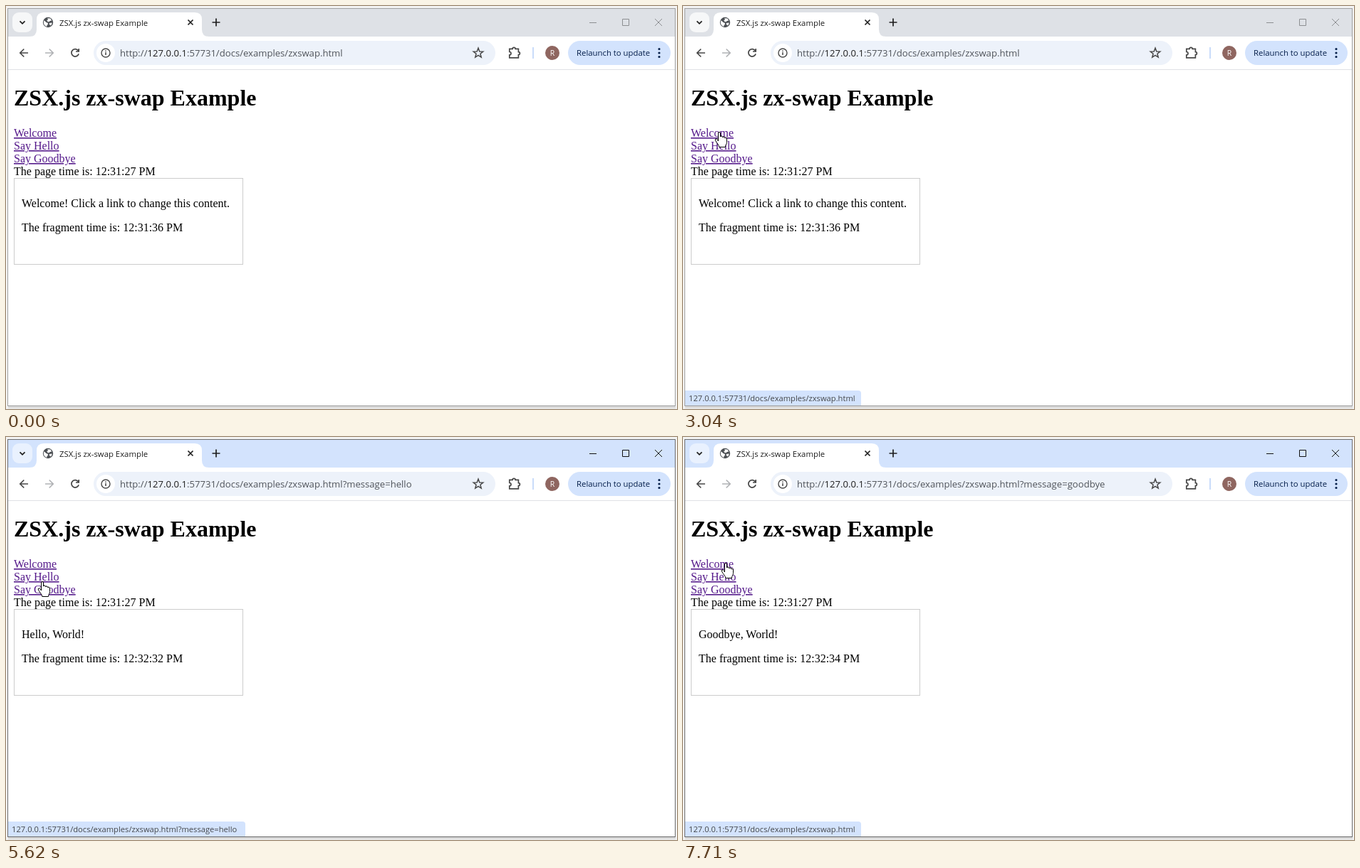
An HTML page for the animation above (8000 ms loop, 942 by 567 pixels).

```html
<!DOCTYPE html>
<html lang="en">
<head>
<meta charset="utf-8">
<title>ZSX.js zx-swap Example</title>
<style>
  html, body { margin: 0; width: 100%; height: 100%; overflow: hidden; background: #f3f3f3; }
  svg { display: block; width: 942px; height: 567px; }
  text { white-space: pre; }
  .ui { font-family: 'Open Sans', 'Noto Sans', sans-serif; font-size: 11.35px; fill: #1f1f1f; }
  .url { font-size: 13.12px; fill: #50545a; }
  .page { font-family: 'Liberation Serif', 'Times New Roman', serif; font-size: 16px; fill: #000; }
  .link { fill: #551a8b; text-decoration: underline; }
  .link.active { fill: #f00; }
  .icon { fill: none; stroke: #474747; stroke-width: 1.7; }
  #frame { fill: none; stroke: #a0a0a0; }
  #bar { fill: #dee1e6; }
  #search { fill: #f6f7f8; }
  #controls { fill: none; stroke: #8c8e91; }
  .focused #frame { stroke: #6c6c6c; }
  .focused #bar { fill: #d3e3fd; }
  .focused #search { fill: #e9f1fe; }
  .focused #controls { stroke: #111; }
  #spot { fill: #fff566; mix-blend-mode: multiply; }
  #cursor path { fill: #fff; stroke: #000; }
</style>
</head>
<body>
<svg id="stage" viewBox="0 0 942 567">
  <defs>
    <linearGradient id="shade" x2="0" y2="1">
      <stop stop-color="#d2d2d2"/><stop offset="1" stop-color="#ececec"/>
    </linearGradient>
  </defs>
  <rect width="942" height="567" fill="#f3f3f3"/>
  <rect x="3" y="563" width="937" height="4" fill="url(#shade)"/>
  <rect x="3" y="4" width="936" height="558" fill="#fff"/>
  <rect id="bar" x="3" y="4" width="936" height="39"/>

  <!-- tab strip -->
  <rect id="search" x="9" y="9" width="28" height="28" rx="9"/>
  <path class="icon" d="M19.5 21.3l3.5 3.5 3.5-3.5" style="stroke:#1f1f1f"/>
  <path d="M33 43q10 0 10-10V19q0-10 10-10H265q10 0 10 10V33q0 10 10 10Z" fill="#fff"/>
  <circle cx="59" cy="23" r="7.2" fill="#4c5054"/>
  <path d="M53.6 20.3l3.2 3 2 .5v2.3l-1.4 1.2v1.6q-4.6-1.4-4.6-6.2ZM58.2 17.3l4 .2 2 3-2.6.4-1.2 1.6-2.2-.8-1-1.8 1.8-.5ZM61 24l3.6-.4q0 2.4-1.8 4l-2.2-1.8Z" fill="#fff"/>
  <text class="ui" x="75" y="28">ZSX.js zx-swap Example</text>
  <path class="icon" d="M255.5 19.5l7 7m0-7l-7 7M289.5 23h11M295 17.5v11" style="stroke:#1f1f1f"/>
  <path id="controls" d="M819 23.5h10M865.5 18.5h9v9h-9ZM911 18l10 10m0-10l-10 10"/>

  <!-- toolbar -->
  <path class="icon" d="M31 66H20M25.3 60.5l-5.5 5.5 5.5 5.5"/>
  <path class="icon" d="M55 66h11M60.7 60.5l5.5 5.5-5.5 5.5" style="stroke:#b0b2b5"/>
  <path class="icon" d="M101.6 63.2a5.2 5.2 0 1 0 .5 4M102.2 60v4h-4.2"/>
  <rect x="123" y="49" width="564" height="34" rx="17" fill="#edf2fa"/>
  <circle cx="140" cy="66" r="13" fill="#fff"/>
  <circle class="icon" cx="140" cy="66" r="6" style="stroke-width:1.4"/>
  <path class="icon" d="M140 65v4M140 62.4v1.6" style="stroke-width:1.5"/>
  <text class="ui url" x="160" y="71">http://<tspan fill="#1f1f1f">127.0.0.1</tspan>:57731/docs/examples/zxswap.html<tspan id="query"></tspan></text>
  <path id="star" class="icon" style="stroke-width:1.5"/>
  <path class="icon" d="M706.8 60.3h4.3a2 2 0 0 1 4 0h4.3v4.3a2 2 0 0 1 0 4v4.3h-12.6v-4a2.2 2.2 0 0 0 0-4.4Z"/>
  <path d="M740 58v16" stroke="#c9dcfa" stroke-width="2"/>
  <circle cx="767" cy="66" r="10" fill="#8f6660"/>
  <text class="ui" x="767" y="70" text-anchor="middle" style="fill:#fff;font-size:10.5px">R</text>
  <rect x="789" y="49" width="144" height="34" rx="17" fill="#d3e3fd"/>
  <text class="ui" x="801" y="70" style="fill:#041e49">Relaunch to update</text>
  <path d="M917 60.5h0M917 66h0M917 71.5h0" stroke="#041e49" stroke-width="3.2" stroke-linecap="round"/>
  <path d="M3 89.5h936" stroke="#dfe1e5"/>

  <!-- page -->
  <g class="page">
    <text x="11" y="140" font-size="32" font-weight="700">ZSX.js zx-swap Example</text>
    <text class="link" x="11" y="184">Welcome</text>
    <text class="link" x="11" y="202">Say Hello</text>
    <text class="link" x="11" y="220">Say Goodbye</text>
    <text x="11" y="238">The page time is: 12:31:27 PM</text>
    <rect x="11.5" y="242.5" width="321" height="121" fill="none" stroke="#ccc"/>
    <text id="message" x="22" y="283"></text>
    <text id="stamp" x="22" y="317"></text>
  </g>

  <g id="status">
    <path id="bubble" fill="#d3e3fd"/>
    <text class="ui" x="8" y="556" style="fill:#44474b;font-size:11.18px">127.0.0.1:57731/docs/examples/zxswap.html<tspan id="target"></tspan></text>
  </g>
  <rect id="frame" x="2.5" y="3.5" width="937" height="559"/>

  <circle id="spot" r="12.5"/>
  <g id="cursor">
    <path id="arrow" d="M.5.7V16.6L4.2 13.1 6.6 18.5 9.2 17.4 6.8 12.1H11.6Z"/>
    <path id="hand" d="M-1.5 13V2Q-1.5.5 0 .5T1.5 2V7Q1.7 5.9 3 5.9T4.5 7.4V8Q4.7 6.9 6 6.9T7.5 8.4V9Q7.8 8 9 8.1T10.5 10V14.5Q10.5 16.6 9.3 18.3Q8.5 19.6 8.5 21.5H-.2Q-.3 19.6-1.6 18Q-3.4 15.6-5 13Q-6.5 10.8-5.3 10Q-3.8 9.2-2.6 11Z"/>
  </g>
</svg>
<script>
const LOOP = 8000, STEP = 67;
const el = id => document.getElementById(id);
const links = [...document.querySelectorAll('.link')];
const linkEnds = [72, 75, 98];

// pointer path: time, x, y
const path = [
  [1040, 915, 577], [1110, 880, 556], [1870, 443, 299], [2300, 165, 213],
  [2710, 60, 181], [3040, 51, 177], [3690, 51, 177], [4100, 51, 195],
  [4300, 51, 196], [5553, 51, 196], [5620, 51, 203], [6030, 51, 217],
  [7170, 51, 217], [7710, 60, 177], [LOOP, 60, 177]
];

const clicks = [
  { link: 0, down: 3240, red: 3310, up: 3370, y: 177 },
  { link: 1, down: 4690, red: 4690, up: 4820, y: 197 },
  { link: 2, down: 6760, red: 6830, up: 6910, y: 217 }
];

const WELCOME = 'Welcome! Click a link to change this content.';
const contents = [
  { from: 0, text: WELCOME, time: '12:31:36', query: '' },
  { from: 3370, text: WELCOME, time: '12:32:31', query: '' },
  { from: 4820, text: 'Hello, World!', time: '12:32:32', query: '?message=hello' },
  { from: 6910, text: 'Goodbye, World!', time: '12:32:34', query: '?message=goodbye' }
];

const statuses = {
  home: ['', 250],
  short: ['?message...', 314],
  hello: ['?message=hello', 336],
  goodbye: ['?message=goodbye', 357]
};

const slope = (i, k) => (path[i + 1][k] - path[i][k]) / (path[i + 1][0] - path[i][0]);

function tangent(i, k) {
  if (i === 0) return slope(0, k);
  if (i === path.length - 1) return 0;
  const a = slope(i - 1, k), b = slope(i, k);
  return a * b > 0 ? 2 * a * b / (a + b) : 0;
}

function pointer(t) {
  let i = 0;
  while (i < path.length - 2 && t >= path[i + 1][0]) i++;
  const span = path[i + 1][0] - path[i][0];
  const n = Math.max(1, Math.round(span / STEP));
  const u = Math.floor((t - path[i][0]) / span * n) / n, v = 1 - u;
  return [1, 2].map(k => Math.round(
    path[i][k] * v * v * (1 + 2 * u) + path[i + 1][k] * u * u * (3 - 2 * u) +
    span * u * v * (tangent(i, k) * v - tangent(i + 1, k) * u)));
}

function linkAt(x, y) {
  const i = Math.floor((y - 170.5) / 18);
  return x < linkEnds[i] ? i : -1;
}

function statusFor(link, t) {
  if (link === 0) return statuses.home;
  if (link === 2) return statuses.goodbye;
  return t < 5620 ? statuses.short : statuses.hello;
}

const show = (node, on) => node.setAttribute('visibility', on ? 'visible' : 'hidden');

function render(t) {
  const [x, y] = pointer(Math.max(t, 1110));
  const over = linkAt(x, y);
  const click = clicks.find(c => t >= c.down && t < c.up);
  const content = contents.filter(c => t >= c.from).pop();

  el('stage').classList.toggle('focused', t >= clicks[0].down);
  links.forEach((a, i) => a.classList.toggle('active', !!click && click.link === i && t >= click.red));
  el('message').textContent = content.text;
  el('stamp').textContent = `The fragment time is: ${content.time} PM`;
  el('query').textContent = content.query;

  show(el('status'), over >= 0 && t >= 2770);
  if (over >= 0) {
    const [query, right] = statusFor(over, t);
    el('target').textContent = query;
    el('bubble').setAttribute('d', `M3 541H${right - 4}q4 0 4 4V562H3Z`);
  }

  show(el('spot'), click);
  if (click) el('spot').setAttribute('transform', `translate(50.5 ${click.y + 0.5})`);

  const visible = t >= 1110;
  el('cursor').setAttribute('transform', `translate(${x} ${y})`);
  show(el('arrow'), visible && over < 0);
  show(el('hand'), visible && over >= 0);
}

el('star').setAttribute('d', 'M' + Array.from({ length: 10 }, (_, i) => {
  const a = i * Math.PI / 5, r = i % 2 ? 3 : 7.2;
  return [663 + r * Math.sin(a), 66.3 - r * Math.cos(a)].map(n => n.toFixed(1)).join(' ');
}).join('L') + 'Z');

const start = performance.now();
function tick() {
  render((performance.now() - start) % LOOP);
  requestAnimationFrame(tick);
}
tick();
</script>
</body>
</html>
```
